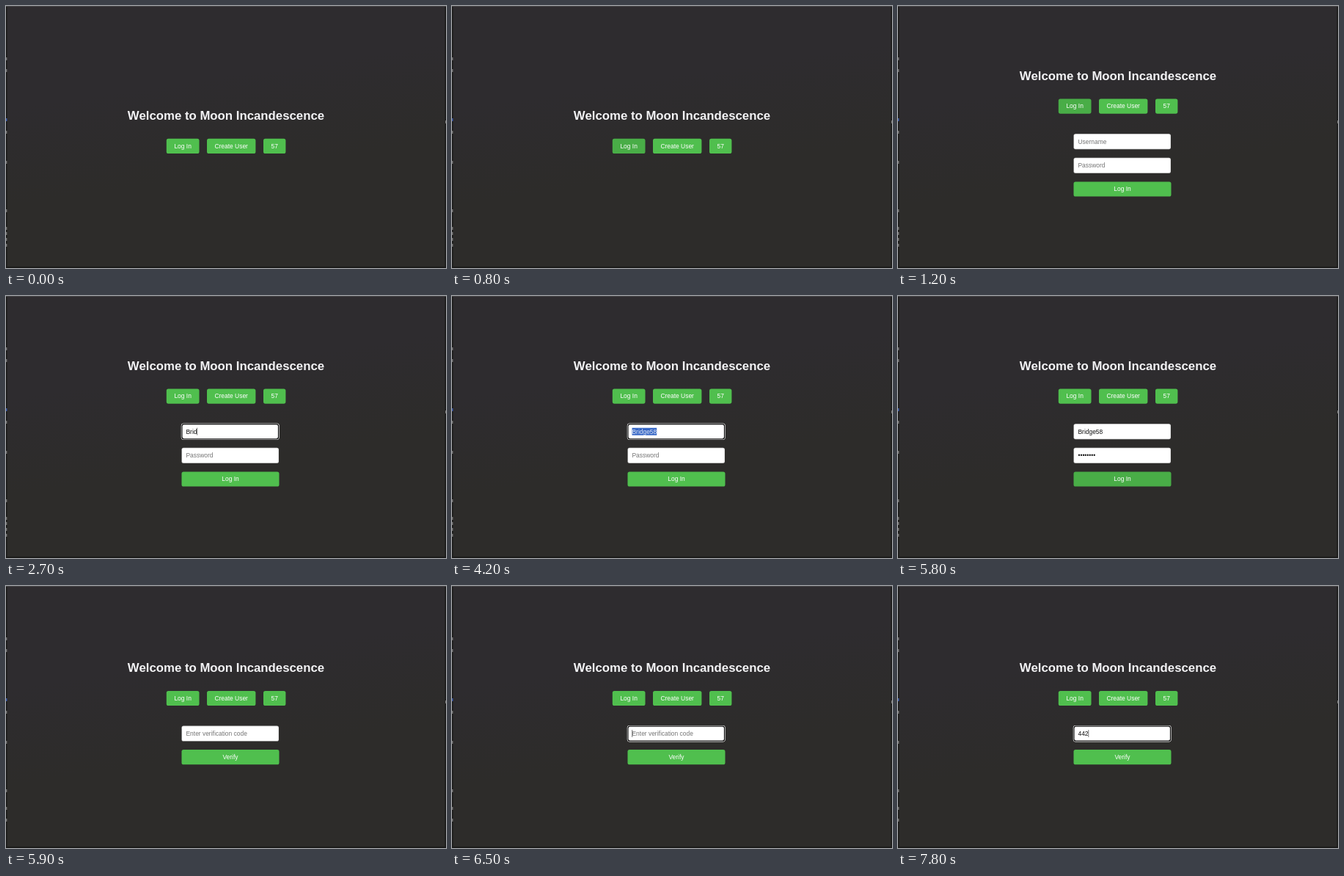
An HTML page that plays this animation: 600 px wide and 357 px high, repeating every 8 s.

```html
<!DOCTYPE html>
<html lang="en">
<head>
<meta charset="utf-8">
<title>Login</title>
<style>
  html, body { margin: 0; width: 100%; height: 100%; overflow: hidden; background: #2d2c2b; }
  svg { display: block; width: 100%; height: 100%; }
  text { font: 8.44px "Liberation Sans", Arial, sans-serif; fill: #fff; white-space: pre; }
  .title { font-size: 16.8px; font-weight: bold; fill: #f3f3f5; }
  .middle { text-anchor: middle; }
</style>
</head>
<body>
<svg id="stage" viewBox="0 0 600 357" preserveAspectRatio="none">
  <defs>
    <linearGradient id="back" x1="0.3" y1="0" x2="0.55" y2="1">
      <stop offset="0.3" stop-color="#2e2c2f"/>
      <stop offset="0.65" stop-color="#2d2c2a"/>
    </linearGradient>
  </defs>
  <rect width="600" height="357" fill="#181817"/>
  <rect x="1.5" y="0" width="597" height="355.3" fill="url(#back)"/>
  <rect width="600" height="1" fill="#454446"/>
</svg>
<script>
const LOOP = 8000, STEP = 100;
const TEXT_X = 245.5;
const GREEN = [80, 191, 78], HOVER_GREEN = [73, 173, 71];
const stage = document.getElementById("stage");

function add(parent, tag, attrs = {}, content = "") {
  const node = document.createElementNS("http://www.w3.org/2000/svg", tag);
  set(node, attrs);
  node.textContent = content;
  return parent.appendChild(node);
}

function set(node, attrs) {
  for (const key in attrs) node.setAttribute(key, attrs[key]);
}

function show(node, visible) {
  node.style.display = visible ? "" : "none";
}

function box(parent, x, y, width, height, rx, fill) {
  return add(parent, "rect", { x, y, width, height, rx, fill });
}

function button(parent, x, y, width, label) {
  const face = box(parent, x, y, width, 20.2, 2.6, "");
  const text = add(parent, "text", { x: x + width / 2, y: y + 12.9, class: "middle" }, label);
  return {
    text,
    hover(level) {
      const rgb = GREEN.map((c, i) => Math.round(c + (HOVER_GREEN[i] - c) * level));
      face.setAttribute("fill", `rgb(${rgb})`);
    }
  };
}

function field(parent, y) {
  const group = add(parent, "g", { transform: `translate(0 ${y})` });
  const ring = add(group, "g");
  box(ring, 238.8, -0.7, 133.9, 22.5, 3.4, "#fff");
  box(ring, 239.4, -0.1, 132.7, 21.3, 2.9, "#101010");
  const edge = box(group, 239.5, 0, 132.5, 21, 2.6, "#d2d2d2");
  const inside = box(group, 240.1, 0.6, 131.3, 19.8, 2.1, "#fff");
  const mark = box(group, TEXT_X, 5.5, 0, 10, 0, "#3566c6");
  const text = add(group, "text", { x: TEXT_X, y: 13.4 });
  const caret = box(group, 0, 5.4, 0.6, 10, 0, "#222");

  return {
    group,
    update({ value, hint, focus = false, selected = false, blink = false }) {
      show(ring, focus);
      show(edge, !focus);
      set(inside, focus
        ? { x: 240.6, y: 1.1, width: 130.3, height: 18.9 }
        : { x: 240.1, y: 0.6, width: 131.3, height: 19.8 });
      text.textContent = value || hint;
      text.style.fill = selected ? "#e6ebf5" : value ? "#111" : "#757575";
      const width = value ? text.getComputedTextLength() : 0;
      mark.setAttribute("width", selected ? width : 0);
      caret.setAttribute("x", TEXT_X + width);
      show(caret, focus && !selected && !blink);
    }
  };
}

// Slivers of the window behind, at the screen edges
function sliver(parent, y, fill = "#777") {
  box(parent, 0, y, 1.4, 4, 0, fill);
}
[70, 86, 170, 211, 277, 301].forEach(y => sliver(stage, y));
sliver(stage, 153, "#3f62b5");
box(stage, 599, 156, 1, 4, 0, "#777");
const earlySlivers = add(stage, "g");
[308, 316, 324].forEach(y => sliver(earlySlivers, y));
const lateSlivers = add(stage, "g");
sliver(lateSlivers, 317);

const page = add(stage, "g");
add(page, "text", { x: 300, y: 100.8, class: "title middle" }, "Welcome to Moon Incandescence");
const logIn = button(page, 218.8, 126.5, 44.7, "Log In");
button(page, 274, 126.5, 66.4, "Create User").hover(0);
button(page, 351, 126.5, 30.4, "57").hover(0);

const form = add(page, "g");
const first = field(form, 174.2);
const second = field(form, 206.8);
const submitGroup = add(form, "g");
const submit = button(submitGroup, 239.5, 239.4, 133, "Log In");

const nameKeys = [2100, 2400, 2600, 2700, 2900, 3200, 3500, 3800];
const codeKeys = [7500, 7700, 7800];
const typed = (word, keys, t) => word.slice(0, keys.filter(k => k <= t).length);
const ramp = (t, from, to) => Math.min(1, Math.max(0, (t - from) / (to - from)));

function render(time) {
  const t = Math.floor((time % LOOP) / STEP) * STEP;
  const welcome = t < 1200, verify = t >= 5900;

  page.setAttribute("transform", `translate(0 ${welcome ? 54.3 : verify ? 16.4 : 0})`);
  show(form, !welcome);
  show(second.group, !verify);
  show(earlySlivers, !verify);
  show(lateSlivers, verify);
  submitGroup.setAttribute("transform", `translate(0 ${verify ? -32.7 : 0})`);
  submit.text.textContent = verify ? "Verify" : "Log In";

  logIn.hover(ramp(t, 500, 800) - ramp(t, 1200, 1400));
  submit.hover(verify
    ? ramp(t, 6000, 6300) - ramp(t, 6300, 6500)
    : ramp(t, 5400, 5700));

  if (verify) {
    first.update({
      value: typed("442", codeKeys, t),
      hint: "Enter verification code",
      focus: t >= 6500,
      blink: t >= 7100 && t < 7500
    });
  } else {
    first.update({
      value: typed("Bridge58", nameKeys, t),
      hint: "Username",
      focus: t >= 1600 && t < 5200,
      selected: t >= 4200 && t < 5200
    });
    second.update({
      value: t >= 5200 ? "•".repeat(8) : "",
      hint: "Password",
      focus: t >= 5200 && t < 5800
    });
  }
}

const start = performance.now();
function tick() {
  render(performance.now() - start);
  requestAnimationFrame(tick);
}
tick();
</script>
</body>
</html>
```
